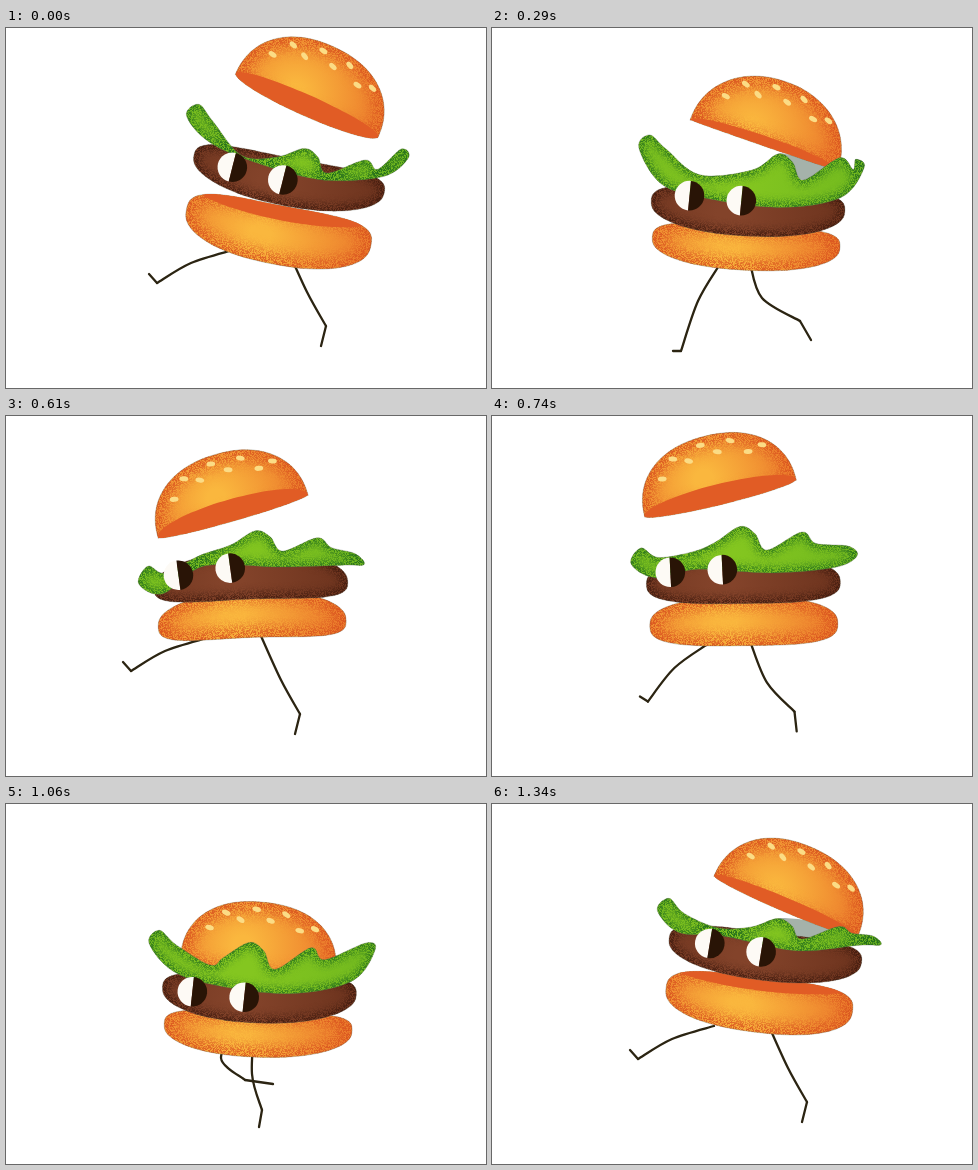
These frames come from a looping animation (480x360 px, 1.38 s). An HTML page with a canvas:

```html
<!DOCTYPE html>
<html lang="en">
<head>
<meta charset="utf-8">
<title>Running burger</title>
<style>
html, body { margin: 0; width: 100%; height: 100%; overflow: hidden; background: #fff; }
canvas { display: block; }
</style>
</head>
<body>
<canvas id="stage" width="480" height="360"></canvas>
<script>
const W = 480, H = 360, LOOP = 1380, STRIDE = 610;
const ctx = document.getElementById('stage').getContext('2d');
const layer = newCanvas(W, H);

// x, y, tilt (degrees) and bend place the stack; gap is the distance from lower bun to patty.
// leafL, leafR, bump and floor are heights in the lettuce, bumpX shifts its waves.
// dome, rim and under are the heights of the top bun and of its cut face.
const poses = [
  { x: 272, y: 203, tilt: 11, bend: 4, gap: 54, eyeX: -31, eyeY: -1, // leap
    leafL: -50, leafR: -44, bump: 21, floor: -15, bumpX: 10, shade: 0,
    bunX: 301, bunY: 77, bunTilt: 24, dome: 64, rim: 10, under: 11 },
  { x: 254, y: 217, tilt: 3, bend: 3, gap: 36, eyeX: -33, eyeY: -11, // land
    leafL: -65, leafR: -51, bump: 26, floor: -33, bumpX: 27, shade: 1,
    bunX: 272, bunY: 117, bunTilt: 19, dome: 67, rim: 9, under: 1 },
  { x: 237, y: 203, tilt: 0, bend: -4, gap: 39, eyeX: -34, eyeY: -4, // squash
    leafL: -29, leafR: -36, bump: 1, floor: -23, bumpX: 10, shade: 0,
    bunX: 233, bunY: 118, bunTilt: 0, dome: 36, rim: 0, under: 20 },
  { x: 246, y: 203, tilt: -2, bend: -5, gap: 39, eyeX: -46, eyeY: -8, // hop
    leafL: -24, leafR: -30, bump: 20, floor: -24, bumpX: 6, shade: 0,
    bunX: 227, bunY: 100, bunTilt: -16, dome: 64, rim: 17, under: 5 },
  { x: 259, y: 212, tilt: 1, bend: 2, gap: 45, eyeX: -48, eyeY: -13, // land
    leafL: -53, leafR: -45, bump: 28, floor: -36, bumpX: -14, shade: 0,
    bunX: 230, bunY: 98, bunTilt: -11, dome: 63, rim: 10, under: 9 },
  { x: 252, y: 227, tilt: 2, bend: 4, gap: 36, eyeX: -41, eyeY: -1, // squash
    leafL: -56, leafR: -50, bump: 26, floor: -30, bumpX: -12, shade: 0,
    bunX: 252, bunY: 160, bunTilt: 6, dome: 62, rim: 0, under: 15 },
  { x: 267, y: 198, tilt: 7, bend: 3, gap: 49, eyeX: -30, eyeY: -4, // rise
    leafL: -39, leafR: -26, bump: 18, floor: -21, bumpX: 8, shade: 1,
    bunX: 294, bunY: 102, bunTilt: 23, dome: 64, rim: 8, under: 6 }
];

// One leg through a full run cycle; x is relative to the body. The other leg runs half a cycle later.
const legCycle = [
  { hip: [-45, 222], knee: [-87, 235], ankle: [-121, 255], toe: [-129, 246] },
  { hip: [-26, 236], knee: [-48, 273], ankle: [-65, 323], toe: [-73, 323] },
  { hip: [-3, 218], knee: [-6, 270], ankle: [4, 306], toe: [1, 323] },
  { hip: [9, 220], knee: [29, 264], ankle: [48, 298], toe: [43, 318] },
  { hip: [4, 235], knee: [16, 270], ankle: [54, 293], toe: [65, 312] },
  { hip: [-18, 220], knee: [-37, 254], ankle: [-13, 276], toe: [15, 280] }
];

// Start times of the held drawings within one stride.
const holds = [0, 130, 210, 290, 370, 450, 490, 530, 570];
const LANDING = 290;

const bread = { light: '#fab73e', mid: '#ed7f2d', dark: '#d9541f', edge: 20, blur: 7 };
const leaf = { light: '#84c620', mid: '#74bb1f', dark: '#226c1c', edge: 10, blur: 4 };
const meat = { light: '#83432a', mid: '#6f351f', dark: '#3c180c', edge: 11, blur: 5 };
const CUT = '#e15c25', INK = '#2b2412';
const grain = ctx.createPattern(makeGrain(256), 'repeat');

function newCanvas(w, h) {
  const canvas = document.createElement('canvas');
  canvas.width = w;
  canvas.height = h;
  return canvas.getContext('2d');
}

function makeGrain(size) {
  const tile = newCanvas(size, size);
  const image = tile.createImageData(size, size);
  let seed = 7;
  for (let i = 3; i < image.data.length; i += 4) {
    seed = (seed * 1664525 + 1013904223) % 4294967296;
    image.data[i] = 255 * Math.min(1, 1.5 * (seed / 4294967296) ** 1.4);
  }
  tile.putImageData(image, 0, 0);
  return tile.canvas;
}

const mix = (a, b, k) => Array.isArray(a) ? a.map((v, i) => mix(v, b[i], k)) : a + (b - a) * k;

function blend(keys, position) {
  const i = Math.floor(position), next = keys[(i + 1) % keys.length], out = {};
  for (const name in next) out[name] = mix(keys[i][name], next[name], position - i);
  return out;
}

const place = (x, y, degrees) => ([px, py]) => {
  const c = Math.cos(degrees * Math.PI / 180), s = Math.sin(degrees * Math.PI / 180);
  return [x + px * c - py * s, y + px * s + py * c];
};

// Superellipse with separate heights above and below its axis.
function blob(width, up, down, power) {
  const curve = v => Math.sign(v) * Math.abs(v) ** (2 / power);
  return Array.from({ length: 48 }, (_, i) => {
    const a = i / 24 * Math.PI, y = curve(Math.sin(a));
    return [width / 2 * curve(Math.cos(a)), y * (y < 0 ? up : down)];
  });
}

// Catmull-Rom curve through the points.
function smooth(points, closed = true) {
  const path = new Path2D(), n = points.length;
  const at = i => closed ? points[(i + n) % n] : points[Math.max(0, Math.min(n - 1, i))];
  path.moveTo(...points[0]);
  for (let i = 0; i < (closed ? n : n - 1); i++) {
    const [a, b, c, d] = [at(i - 1), at(i), at(i + 1), at(i + 2)];
    path.bezierCurveTo(b[0] + (c[0] - a[0]) / 6, b[1] + (c[1] - a[1]) / 6,
      c[0] - (d[0] - b[0]) / 6, c[1] - (d[1] - b[1]) / 6, c[0], c[1]);
  }
  if (closed) path.closePath();
  return path;
}

function fill(path, color) {
  ctx.fillStyle = color;
  ctx.fill(path);
}

// Soft body with a grainy dark edge.
function solid(points, { light, mid, dark, edge, blur }) {
  const path = smooth(points);
  const xs = points.map(p => p[0]), ys = points.map(p => p[1]);
  const left = Math.min(...xs), top = Math.min(...ys);
  const w = Math.max(...xs) - left, h = Math.max(...ys) - top;
  const x = left + w * .4, y = top + h * .55;
  const glow = ctx.createRadialGradient(x, y, w * .06, x, y, w * .55);
  glow.addColorStop(0, light);
  glow.addColorStop(1, mid);
  fill(path, glow);

  layer.clearRect(0, 0, W, H);
  layer.save();
  layer.clip(path);
  layer.filter = `blur(${blur}px)`;
  layer.strokeStyle = dark;
  layer.lineWidth = edge;
  layer.stroke(path);
  layer.restore();
  layer.save();
  layer.globalCompositeOperation = 'destination-in';
  layer.translate(Math.round(left), Math.round(top));
  layer.fillStyle = grain;
  layer.fillRect(-W, -H, 2 * W, 2 * H);
  layer.restore();
  ctx.drawImage(layer.canvas, 0, 0);

  ctx.strokeStyle = 'rgba(80,90,80,.4)';
  ctx.lineWidth = .7;
  ctx.stroke(path);
  return path;
}

function cutFace(outline, points) {
  ctx.save();
  ctx.clip(outline);
  fill(smooth(points), CUT);
  ctx.restore();
}

function drawLeg(x, position) {
  const { hip, knee, ankle, toe } = blend(legCycle, position % 6);
  ctx.save();
  ctx.translate(x, 0);
  ctx.strokeStyle = INK;
  ctx.lineCap = ctx.lineJoin = 'round';
  ctx.lineWidth = 2.3;
  ctx.stroke(smooth([hip, knee, ankle], false));
  ctx.stroke(smooth([ankle, toe], false));
  ctx.restore();
}

function drawBun({ bunTilt, dome, rim, under }, toStage) {
  const width = 156, power = 2.2 + (64 - dome) / 32;
  const upper = blob(width, dome, 0, power), lower = blob(width, rim, under, 2);
  const outline = solid([...lower.slice(0, 24), ...upper.slice(24)].map(toStage), bread);
  if (rim > 1) cutFace(outline, lower.map(toStage));
  ctx.fillStyle = '#fbdc85';
  for (let i = 0; i < 8; i++) {
    const x = -52 + 15 * i, drop = i % 2 ? 0 : .16;
    const [sx, sy] = toStage([x, -dome * (.88 - x * x * .00008 - drop)]);
    ctx.beginPath();
    ctx.ellipse(sx, sy, 4.4, 2.5, (bunTilt + 10 + i % 3 * 9) * Math.PI / 180, 0, 7);
    ctx.fill();
  }
}

function drawBase({ gap }, toStage) {
  const half = (46 + (gap - 38) * .8) / 2;
  const outline = solid(blob(188, half, half, 2.7).map(toStage), bread);
  const lip = Math.min(12, (gap - 40) * 1.2);
  if (lip < 1) return;
  const face = blob(176, lip, lip * .6, 2.4).map(([x, y]) => toStage([x, y - half + lip * .6]));
  cutFace(outline, face);
}

function lettucePoints({ leafL, leafR, bump, floor, bumpX }) {
  const hem = bump * .4 - 16;
  return [
    [-112, leafL + 15], [-102, leafL], [-85, leafL + 11], [-50, floor],
    [bumpX - 25, floor - bump * .35], [bumpX, floor - bump],
    [bumpX + 15, floor - bump * .7], [bumpX + 27, floor],
    [bumpX + 62, floor - bump * .8], [bumpX + 76, floor - 8],
    [105, leafR], [114, leafR + 9],
    [92, hem - 8], [30, hem], [-45, hem - 5], [-88, Math.max(hem - 13, leafL + 31)]
  ];
}

function drawEyes({ eyeX, eyeY }, toStage) {
  const [a, b] = [-26, 26].map(side => toStage([eyeX + side, eyeY]));
  const tilt = Math.atan2(b[1] - a[1], b[0] - a[0]);
  for (const [x, y] of [a, b]) {
    const half = (from, color) => {
      ctx.beginPath();
      ctx.arc(x, y, 14.8, from + tilt, from + tilt + Math.PI);
      ctx.fillStyle = color;
      ctx.fill();
    };
    half(Math.PI / 2, '#fdfaf5');
    half(-Math.PI / 2, '#291406');
  }
}

function draw(phase) {
  const pose = blend(poses, phase);
  const { x, y, tilt, bend, gap } = pose;
  const fall = Math.min(1, phase % 3);
  const bunLift = 70 * fall * (1 - fall);

  const stack = place(x, y, tilt);
  const onBase = ([px, py]) => stack([px, py + bend * (1 - 2 * (px / 95) ** 2)]);
  const onPatty = ([px, py]) => onBase([px, py - gap]);
  const onBun = place(pose.bunX, pose.bunY - bunLift, pose.bunTilt);
  const lettuce = lettucePoints(pose).map(onPatty);

  ctx.fillStyle = '#fff';
  ctx.fillRect(0, 0, W, H);
  drawLeg(x, phase);
  drawLeg(x, phase + 3);
  ctx.globalAlpha = pose.shade;
  fill(smooth([lettuce[5], lettuce[7], lettuce[8], onBun([50, -2])]), '#a5b2aa');
  ctx.globalAlpha = 1;
  drawBun(pose, onBun);
  drawBase(pose, onBase);
  solid(blob(194, 24, 24, 2.6).map(onPatty), meat);
  solid(lettuce, leaf);
  drawEyes(pose, onPatty);
}

// Two strides of fall, squash and rise, then a short hold.
function phaseAt(time) {
  if (time >= 2 * STRIDE) return 6;
  const t = holds.findLast(start => start <= time % STRIDE);
  const step = t < LANDING ? t / LANDING : 1 + 2 * (t - LANDING) / (STRIDE - LANDING);
  return step + 3 * Math.floor(time / STRIDE);
}

let shown;
const start = performance.now();
function tick() {
  const phase = phaseAt((performance.now() - start) % LOOP);
  if (phase !== shown) draw(shown = phase);
  requestAnimationFrame(tick);
}
tick();
</script>
</body>
</html>
```
